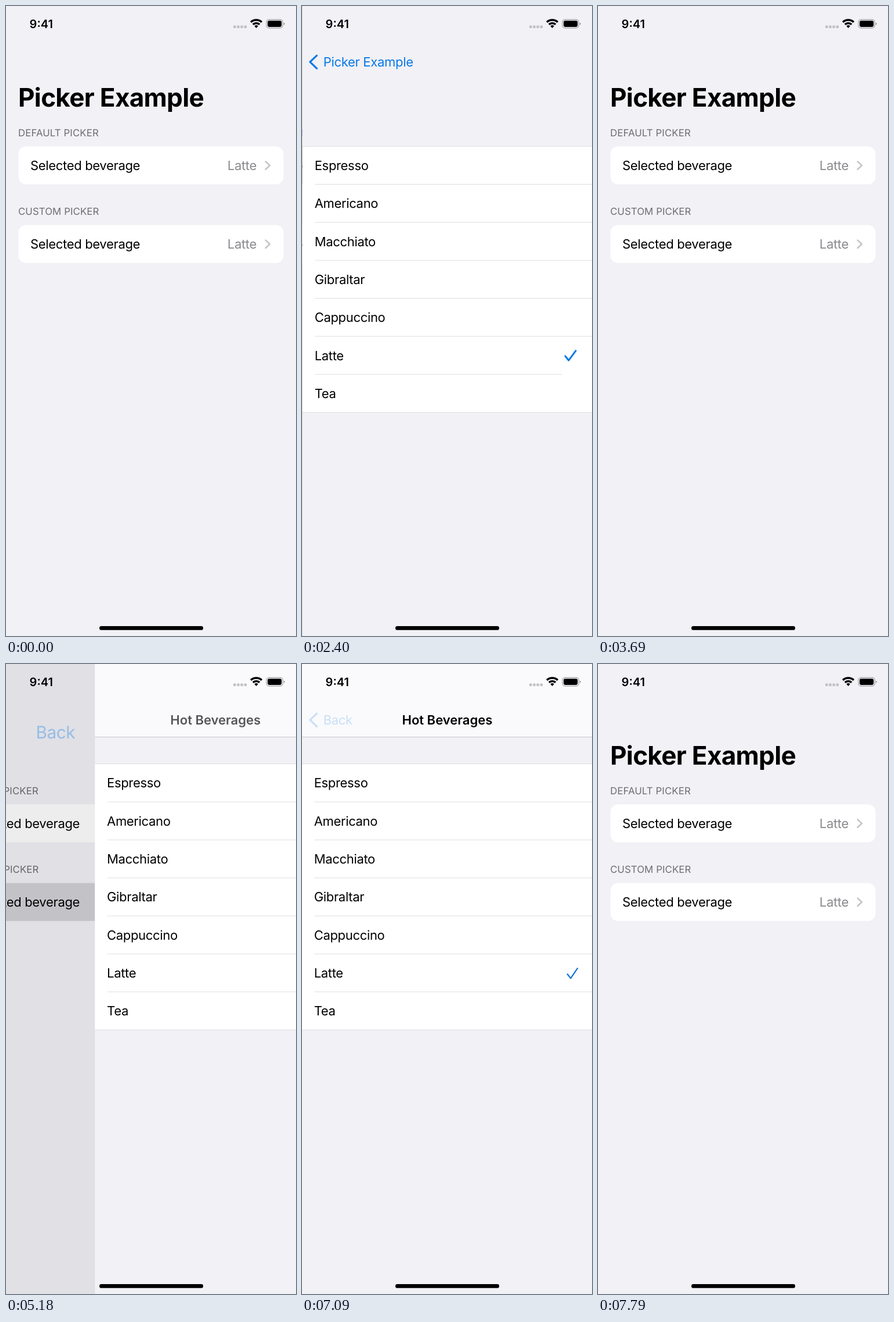
These frames come from a looping animation (500x1083 px, 7.84 s). An HTML page:

```html
<!DOCTYPE html>
<html lang="en">
<head>
<meta charset="utf-8">
<title>Picker Example</title>
<style>
  html, body { margin: 0; width: 100%; height: 100%; overflow: hidden; background: #f1f1f6; }
  svg { display: block; width: 500px; height: 1083px; }
  text { font: 400 22px Inter, sans-serif; letter-spacing: -.33px; font-optical-sizing: none; text-rendering: geometricPrecision; }
  .header { font-size: 16.8px; letter-spacing: .1px; fill: #6d6d72; }
  .value { fill: #3c3c43; fill-opacity: .6; text-anchor: end; }
  .large { font-size: 44px; font-weight: 700; letter-spacing: -.65px; }
  .title { font-weight: 600; letter-spacing: 0; text-anchor: middle; }
  .clock { font-size: 20px; font-weight: 600; letter-spacing: 0; }
  .line { fill: none; stroke-linecap: round; stroke-linejoin: round; }
  .tint { fill: #0878e6; }
  .stroke { stroke: #0878e6; }
  .rule { stroke: #dedee1; }
</style>
</head>
<body>
<svg viewBox="0 0 500 1083">
  <rect width="500" height="1083" fill="#f1f1f6"/>
  <g id="home"></g>
  <rect id="dim" width="500" height="1083"/>
  <g id="page0"></g>
  <g id="page1"></g>

  <text id="large" class="large">Picker Example</text>
  <text id="title" class="title" y="104">Hot Beverages</text>
  <g id="back">
    <path id="chevron" class="line stroke" stroke-width="3.2" d="M25.5 85.2 13.8 96.2 25.5 107.4"/>
    <text id="label" class="tint"></text>
  </g>

  <text class="clock" x="40.6" y="38">9:41</text>
  <g id="dots" fill="#bfbfc4"></g>
  <g fill="none" stroke="#000" stroke-width="3.4">
    <path d="M422.1 27.8A13.7 13.7 0 0 1 440.9 27.8"/>
    <path d="M425.8 31.7A8.3 8.3 0 0 1 437.2 31.7"/>
  </g>
  <path d="M431.5 37.9 428.3 34.4A4.7 4.7 0 0 1 434.7 34.4Z"/>
  <rect x="449.1" y="23.4" width="28" height="14.4" rx="4.4" fill="none" stroke="#9b9b9f" stroke-width="1.2"/>
  <rect x="451" y="25.3" width="24.2" height="10.6" rx="2.8"/>
  <path d="M478.8 28.4Q480.8 29.3 480.8 30.6T478.8 32.9Z" fill="#9b9b9f"/>
  <rect x="161" y="1066" width="179" height="6.8" rx="3.4"/>
</svg>
<script>
const $ = id => document.getElementById(id);
const LOOP = 7840, ROW = 65.33, OMEGA = .014;
const drinks = ['Espresso', 'Americano', 'Macchiato', 'Gibraltar', 'Cappuccino', 'Latte', 'Tea'];

// Moments at which the picture is refreshed
const ticks = [0, 1680, 1840, 1990, 2090, 2190, 2300, 2400, 3030,
  3180, 3280, 3380, 3490, 3590, 3690,
  4970, 5080, 5180, 5280, 5380, 5480, 5580, 5630, 7090,
  7290, 7390, 7490, 7590, 7690, 7790];

const visits = [
  { press: 1680, push: 1797, settled: Infinity, touch: 3030, pop: 3140, end: 3690, label: 'Picker Example', labelX: 21 },
  { press: 4970, push: 5008, settled: 5630, touch: 7090, pop: 7250, end: 7790, label: 'Back', labelX: 79 }
];

const section = (name, y, i) => `
  <text class="header" x="21" y="${y - 17}">${name}</text>
  <rect x="21.4" y="${y}" width="457.2" height="65.4" rx="13.3" fill="#fff"/>
  <rect id="press${i}" x="21.4" y="${y}" width="457.2" height="65.4" rx="13.3" fill="#d1d1d6"/>
  <text x="42" y="${y + 40.6}">Selected beverage</text>
  <text class="value" x="432" y="${y + 40.6}">Latte</text>
  <path class="line" stroke="#3c3c43" stroke-opacity=".3" stroke-width="2.6" d="M447.6 ${y + 26.2}l7.2 6.7-7.2 6.7"/>`;

const rule = (x1, x2, y) => `<path class="rule" d="M${x1} ${y}H${x2}"/>`;

function list(top, inset, check) {
  let out = `<rect width="500" height="1083" fill="#f1f1f6"/>
    <rect y="${top}" width="500" height="${ROW * 7}" fill="#fff"/>` + rule(0, 500, top);
  drinks.forEach((name, i) => {
    const y = top + ROW * i, last = i === drinks.length - 1;
    out += `<text x="20.7" y="${y + 40.7}">${name}</text>`;
    out += rule(last ? 0 : 21.4, name === 'Latte' ? inset : 500, y + ROW);
  });
  return out + check;
}

$('home').innerHTML = section('DEFAULT PICKER', 241.2, 0) + section('CUSTOM PICKER', 376.4, 1);
$('page0').innerHTML = list(241.2, 447,
  '<path class="line stroke" stroke-width="3" d="M452.8 601.8 458.8 609.2 471 592.6"/>');
$('page1').innerHTML = list(171.7, 500,
  '<path class="line" stroke="#0a70cf" stroke-width="2.1" d="M457.6 533 463.2 540.4 475 523.2"/>') +
  '<rect width="500" height="125" fill="#fafafc"/><path stroke="#cacacd" d="M0 125.5H500"/>';
$('dots').innerHTML = [0, 1, 2, 3].map(i =>
  `<rect x="${392 + 6.2 * i}" y="33.4" width="4.4" height="4.7" rx="1.2"/>`).join('');

const clamp = v => Math.max(0, Math.min(1, v));
const mix = (a, b, k) => a + (b - a) * k;
const set = (id, attrs) => { for (const k in attrs) $(id).setAttribute(k, attrs[k]); };
const place = (x, y, s) => `translate(${x} ${y}) scale(${s})`;

// Critically damped spring from 0 to 1
function spring(ms) {
  const u = OMEGA * Math.max(0, ms);
  return 1 - (1 + u) * Math.exp(-u);
}

function progress(v, t) {
  if (t >= v.end) return 0;
  if (t >= v.pop) return 1 - spring(t - v.pop);
  return t >= v.settled ? 1 : spring(t - v.push);
}

function draw(t) {
  const now = t < visits[1].press ? 0 : 1, v = visits[now];
  const p = progress(v, t), q = p ** 1.17;
  const pressed = t >= v.touch && t < v.pop;

  set('home', { transform: `translate(${-150 * p} 0)` });
  set('dim', { opacity: .1 * p });
  visits.forEach((_, i) => {
    const on = i === now;
    set('page' + i, {
      transform: `translate(${500 * (1 - p)} 0)`,
      visibility: on && p > 0 ? 'visible' : 'hidden'
    });
    set('press' + i, { opacity: !on || t < v.press || t >= v.end ? 0 : t >= v.pop ? p : 1 });
  });

  set('large', {
    transform: place(mix(21, 36.7, q), mix(173.4, 104, q), mix(1, .5, q)),
    opacity: clamp(1 - 1.55 * p)
  });
  $('label').textContent = v.label;
  set('label', {
    transform: place(mix(v.labelX, 36.7, q), mix(173.4, 104, q), mix(2, 1, q)),
    opacity: p ** 3
  });
  set('chevron', { opacity: clamp(4 * p - 3) });
  set('back', { opacity: pressed ? .2 : 1 });
  set('title', { x: 250.4 + 318 * (1 - q), opacity: now ? q : 0 });
}

function frame() {
  const t = performance.now() % LOOP;
  draw(ticks.findLast(k => k <= t));
  requestAnimationFrame(frame);
}
frame();
</script>
</body>
</html>
```
